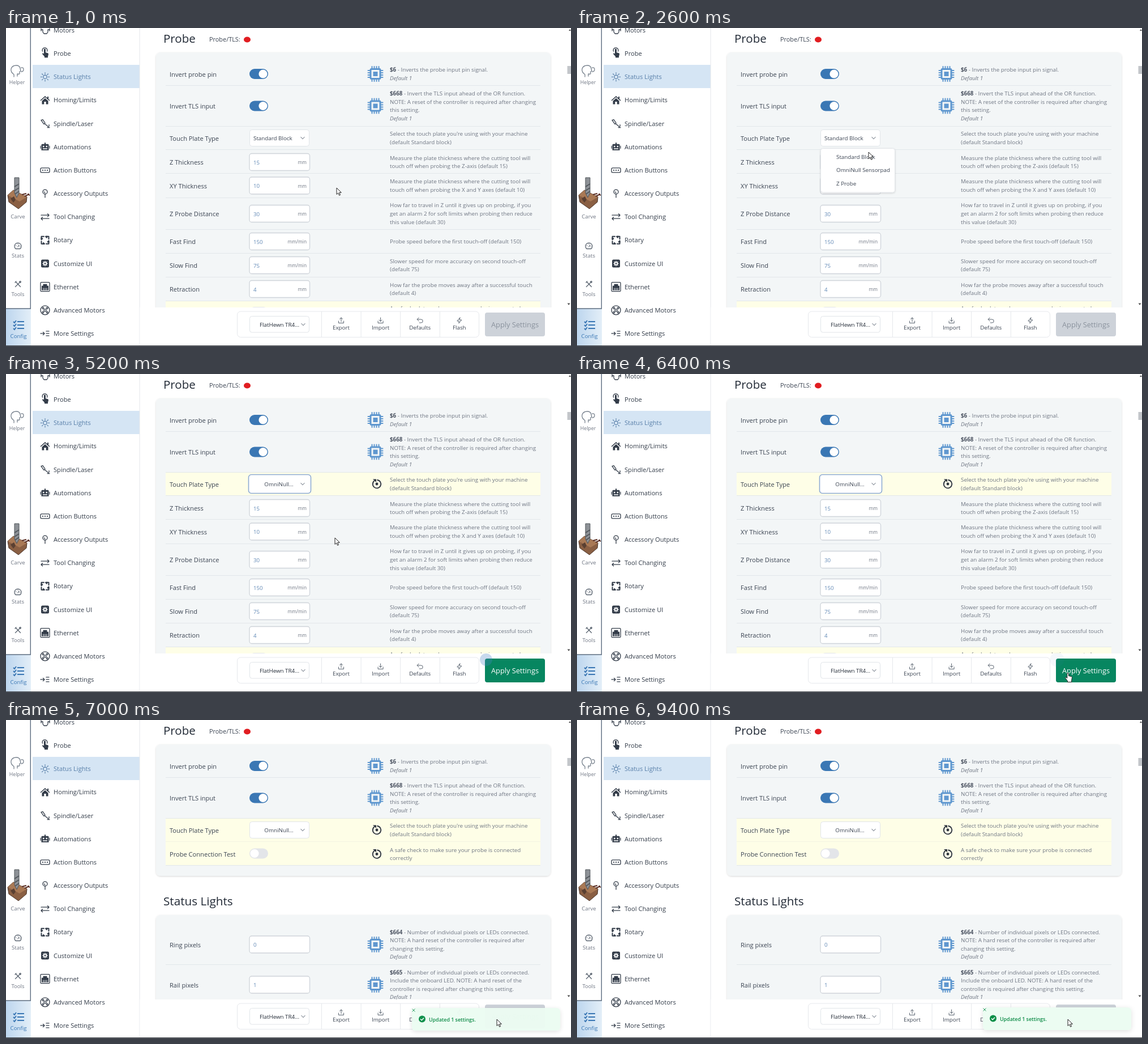
These frames come from a looping animation (998x561 px, 9800 ms). An HTML page:

```html
<!DOCTYPE html>
<html lang="en">
<head>
<meta charset="utf-8">
<title>Probe settings</title>
<style>
  html, body { margin: 0; width: 100%; height: 100%; overflow: hidden; background: #fff; }
  svg { display: block; font-family: "Open Sans", "Noto Sans", sans-serif; }
  .ln { fill: none; stroke: currentColor; stroke-width: 1.3; stroke-linecap: round; stroke-linejoin: round; }
  .solid { fill: currentColor; }
</style>
</head>
<body>
<svg id="stage" width="998" height="561" viewBox="0 0 998 561"></svg>
<script>
const LOOP = 9800, STEP = 200;
const INK = '#3b4452', GREY = '#6f7683', BLUE = '#3a77b4', VALUE = '#6088b5', EDGE = '#e1e5e9';

// Drawing helpers; text is placed by its vertical centre.
const text = (x, y, s, size, fill = INK, more = '') =>
  `<text x="${x}" y="${(y + size * .36).toFixed(1)}" font-size="${size}" fill="${fill}" ${more}>${s}</text>`;
const mid = 'text-anchor="middle"';
const rect = (x, y, w, h, r, fill, more = '') =>
  `<rect x="${x}" y="${y}" width="${w}" height="${h}" rx="${r}" fill="${fill}" ${more}/>`;
const stroke = (color, w = 1) => `stroke="${color}" stroke-width="${w}"`;
const line = (d, color, w = 1) => `<path d="${d}" fill="none" ${stroke(color, w)}/>`;
const icon = (x, y, color, body) => `<g transform="translate(${x} ${y})" color="${color}">${body}</g>`;
const ln = d => `<path class="ln" d="${d}"/>`;
const solid = d => `<path class="solid" d="${d}"/>`;
const ring = (r, x = 0, y = 0) => `<circle class="ln" cx="${x}" cy="${y}" r="${r}"/>`;
const spin = (n, body) =>
  Array.from({ length: n }, (_, i) => `<g transform="rotate(${i * 360 / n})">${body}</g>`).join('');
const chevron = (x, y) => line(`M${x - 3.5} ${y - 1.8}l3.5 3.5 3.5-3.5`, '#8d949e', 1.1);

const chip = y => icon(652.5, y, '#5f97cf',
  spin(4, ln('M-6-13V-9M-2-13V-9M2-13V-9M6-13V-9').replace('/>', ' style="stroke-width:2"/>')) +
  rect(-8.5, -8.5, 17, 17, 1.5, 'none', stroke('#5f97cf', 3)) + rect(-4, -4, 8, 8, 0, '#5f97cf'));
const reset = y => icon(655, y, '#2e3440',
  `<path class="ln" style="stroke-width:1.8" d="M-4.5-5.5A7.2 7.2 0 1 0 1-7"/>` +
  solid('M-7-8.5h6v5.5z') + '<circle class="solid" r="2.4"/>');

const toggle = (y, on) => rect(430, y - 9, 33, 18, 9, on ? BLUE : '#e3e5e9') +
  `<circle cx="${on ? 454 : 439}" cy="${y}" r="7.6" fill="#fff"/>`;
const input = (y, value, unit = '') =>
  rect(430, y - 15, 106.5, 30, 4, '#fff', stroke('#cfd4da', 1.3)) +
  text(437, y + .5, value, 9.7, VALUE) + text(531, y + .5, unit, 8.3, GREY, 'text-anchor="end"');
const picker = (y, value, focus) =>
  (focus ? rect(428.5, y - 16.5, 110, 33, 5, '#fff', stroke('#8fabd3', 1.6))
         : rect(430.5, y - 14.5, 105, 29, 4, '#fff', stroke(EDGE))) +
  (value.endsWith('...') ? text(482, y, value, 9.8, INK, mid) : text(437, y, value, 9.8)) + chevron(524, y);

const notes = (y, lines) => lines.map((s, i) => {
  const rich = s.replace(/^\$\d+/, m => `<tspan font-weight="700" fill="#4d5563">${m}</tspan>`);
  return text(678, y + (i - (lines.length - 1) / 2) * 14.6, rich, 9.8, GREY,
    s.startsWith('Default ') ? 'font-style="italic"' : '');
}).join('');
const row = (y, name, control, lines, side = '') =>
  text(289, y + .5, name, 11.1) + control + side + notes(y, lines);
const rule = y => line(`M282 ${y}.5H944`, '#e2e7ea');
const marked = (y, h) => rect(282, y, 662, h, 0, '#fefee7');
const panel = (y, h) => rect(265, y, 697, h, 8, '#f3f6f7', 'filter="url(#soft)"');

const SAFE = ['A safe check to make sure your probe is connected', 'correctly'];
const safeRow = y => row(y, 'Probe Connection Test', toggle(y - 1, false), SAFE, reset(y));

const head = () => text(278, 19, 'Probe', 20.5, '#222a36') + text(359, 20.5, 'Probe/TLS:', 10.9) +
  '<ellipse cx="426" cy="20.5" rx="6" ry="5" fill="#e11d21"/>';
const common = () =>
  row(81, 'Invert probe pin', toggle(81, true),
    ['$6 - Inverts the probe input pin signal.', 'Default 1'], chip(81)) + rule(101) +
  row(137.5, 'Invert TLS input', toggle(137.5, true),
    ['$668 - Invert the TLS input ahead of the OR function.',
     'NOTE: A reset of the controller is required after changing', 'this setting.', 'Default 1'], chip(137.5)) + rule(173);
const plate = (value, focus, changed) => row(194, 'Touch Plate Type', picker(194, value, focus),
  ["Select the touch plate you're using with your machine", '(default Standard block)'], changed ? reset(194) : '');

const blockRows = () => [
  [236.5, 'Z Thickness', 15, 'mm', ['Measure the plate thickness where the cutting tool will', 'touch off when probing the Z-axis (default 15)'], 256],
  [278, 'XY Thickness', 10, 'mm', ['Measure the plate thickness where the cutting tool will', 'touch off when probing the X and Y axes (default 10)'], 299],
  [327.5, 'Z Probe Distance', 30, 'mm', ['How far to travel in Z until it gives up on probing, if you', 'get an alarm 2 for soft limits when probing then reduce', 'this value (default 30)'], 355],
  [376.5, 'Fast Find', 150, 'mm/min', ['Probe speed before the first touch-off (default 150)'], 397],
  [418.5, 'Slow Find', 75, 'mm/min', ['Slower speed for more accuracy on second touch-off', '(default 75)'], 439],
  [460.5, 'Retraction', 4, 'mm', ['How far the probe moves away after a successful touch', '(default 4)'], 481]
].map(([y, name, v, unit, lines, end]) => row(y, name, input(y, v, unit), lines) + rule(end)).join('');

const blockScene = (value, changed) => head() + panel(43, 500) + (changed ? marked(174, 41) : '') + common() +
  plate(value, changed, changed) + rule(214) + blockRows() + marked(482, 42) + safeRow(502);
const shortScene = () => head() + panel(43, 232) + marked(174, 83) + common() +
  plate('OmniNull...', false, true) + line('M282 214.5H944', '#f3f4e2') + safeRow(236.5) + rule(256) +
  text(278, 319, 'Status Lights', 20.7, '#222a36') + panel(344, 200) +
  row(396, 'Ring pixels', input(396, 0),
    ['$664 - Number of individual pixels or LEDs connected.', 'NOTE: A hard reset of the controller is required after',
     'changing this setting.', 'Default 0'], chip(396)) + rule(431) +
  row(467, 'Rail pixels', input(467, 1),
    ['$665 - Number of individual pixels or LEDs connected.', 'Include the onboard LED. NOTE: A hard reset of the',
     'controller is required after changing this setting.', 'Default 1'], chip(467));

const nav = [
  ['Motors', ln('M-7-1h3v4l2 3h5l2-3v-4h3M-7-3v4M8-3v4')],
  ['Probe', solid('M-2-8q1.5-1.5 3 0v6l4 1.2q1 .5 1 2l-1 4v2h-6v-2l-4-4.5q0-1.8 1.5-1.3l1.5 1z') + ln('M-4.5-4a4.4 4.4 0 1 1 8 0')],
  ['Status Lights', ring(3.3) + spin(8, ln('M0-5.8V-7.5'))],
  ['Homing/Limits', solid('M-8.5 0L0-7.5 4-4v-2.5h2v4.3L8.5 0l-1 1L0-5.5-7.5 1zM-5.5 1.2L0-3.6 5.5 1.2V7H1.7V2.5h-3.4V7h-3.8z')],
  ['Spindle/Laser', ln('M-7-6l3-1 4 6-2 2zM-1 0l7 6M4 7h4M7 2v3')],
  ['Automations', solid('M-1-7.5h2V-5h4q1.5 0 1.5 1.5V6h-13v-9.5Q-6.500-5-5-5h4zM-8.500-2h1.200v5h-1.200zM7.300-2h1.200v5H7.300z') +
    '<path fill="#fff" d="M-4-2h2.500v2.500H-4zM1.500-2H4V.5H1.500zM-4 2.500h8V4h-8z"/>'],
  ['Action Buttons', '<rect class="ln" x="-8" y="-4" width="16" height="8" rx="2"/>' + [-4, 0, 4].map(x => `<circle class="solid" cx="${x}" r="1.100"/>`).join('')],
  ['Accessory Outputs', ring(4, 0, -3) + ln('M0 1v6M-1.500-3L0-1')],
  ['Tool Changing', ln('M-7-3H7M4.500-5.500L7-3 4.500-.5M7 3H-7M-4.500.5L-7 3l2.500 2.500')],
  ['Rotary', spin(4, '<path class="ln" style="stroke-width:2" d="M-6.500-2v-4.500h4.500M1-6.500l2 2M1-6.500h3"/>')],
  ['Customize UI', rect(-7, -7, 14, 14, 2.5, 'currentColor') + '<g color="#fff"><circle class="ln" r="2.300" style="stroke-width:1.800"/>' + spin(8, ln('M0-3.500v-.7')) + '</g>'],
  ['Ethernet', '<rect class="ln" x="-8" y="-8" width="16" height="16" rx="1.500"/>' + solid('M-6 6V-2h2.500v-3h7v3H6v8z') +
    '<path d="M-3 6V2M0 6V2M3 6V2" stroke="#fff"/>'],
  ['Advanced Motors', ring(8) + ring(2) + spin(4, ring(1.3, 3.6, -3.6))],
  ['More Settings', ln('M-8 0h7M-3.500-2.500L-1 0l-2.500 2.500M2-4h5M2 0h5M2 4h5')]
];
const sidebar = () => rect(47, 65, 189, 41, 0, '#d5e5f4') + line('M236 0V560', '#e3e6ea') +
  nav.map(([name, art], i) => {
    const y = 4 + i * 41.15, color = i === 2 ? '#587fa9' : '#333c49';
    return icon(69, y, color, art) + text(84, y, name, 11.1, color);
  }).join('');

const rail = () =>
  rect(0, 495, 44, 65, 0, 'url(#tile)') + line('M43.3 0V495H0', '#5d6d80', 1.4) +
  icon(19, 76, '#77818d', ln('M-5 10V6q-6-4-5-10 2-6 9-6 6 0 7 5l1 5-2 1v3q0 2-4 1v4M8-6q4-1 4 3t-4 4')) +
  text(19.5, 96, 'Helper', 8.8, GREY, mid) +
  '<path d="M3 295l10-9 24 12-1 9-14 12-17-12z" fill="#8a5f43" stroke="#4a352a"/>' +
  '<path d="M3 295l10-9 24 12-13 8z" fill="#a97955"/><path d="M8 301l6-4 3 6-4 5z" fill="#5a4032"/>' +
  '<path d="M15 264h8v27l-4 8-4-8z" fill="#8e9297" stroke="#4f5459"/>' +
  line('M15 280l8-5M15 287l8-5M16 293l7-5', '#50555a', 1.6) + line('M28 294l8-2M33 297l8-4M38 293l4 2', '#5b2f25', 2) +
  text(21, 332, 'Carve', 9.6, GREY, mid) +
  icon(21, 385, '#59636f', ln('M-4 4.500a6 6 0 1 1 8 0zM0 1l2-3M-3.500-1h.1M3.500 0h.1M0-4h.1')) +
  text(21, 401, 'Stats', 9.6, GREY, mid) +
  icon(21, 452, '#59636f', ln('M-4.500 4.500L4-4M-4-4.500l8.500 9M-5-3l2-2M2.500-4.500l2-1M4.500-2.500l1-2')) +
  text(21, 469, 'Tools', 9.6, GREY, mid) +
  icon(22, 524, BLUE, '<g stroke-width="2">' + [-6, 0, 6].map(y =>
    `<path d="M-2 ${y}H10M-9 ${y}l2 2 3-4" fill="none" stroke="currentColor"/>`).join('') + '</g>') +
  text(22, 543.5, 'Config', 9.7, BLUE, mid);

const tools = [
  ['Export', 'M0 2V-5M-2.500-2.500L0-5l2.500 2.500M-4.500 1v3.500h9V1'],
  ['Import', 'M0-5V1.500M-2.500-1L0 1.500 2.500-1M-4.500 1v3.500h9V1'],
  ['Defaults', 'M-2-5l-3 3 3 3M-5-2H2q3 0 3 3t-3 3H-1'],
  ['Flash', 'M1-5L-4 1h3.500L-1 5l5-6H.5z']
];
const footer = () => rect(236.5, 493, 754, 67, 0, '#fff') +
  rect(408.500, 500, 427, 45.500, 6, '#fff', stroke('#e6e8ec')) + rect(430.500, 508.500, 105, 28.500, 4, '#fff', stroke(EDGE)) +
  text(483, 523, 'FlatHewn TR4...', 9.8, '#222a36', mid) + chevron(525, 523) +
  tools.map(([name, d], i) => line(`M${557.5 + i * 69.6} 500V545`, '#e6e8ec') +
    icon(592 + i * 69.6, 516, '#59636f', ln(d).replace('/>', ' style="stroke-width:1"/>')) +
    text(592 + i * 69.6, 528.5, name, 9.8, INK, mid + ' font-weight="500"')).join('');
const apply = (bg, fg) => rect(846, 502, 106, 42, 4, bg) + text(899, 523.5, 'Apply Settings', 12.75, fg, mid);

const menu = () => rect(430.5, 212.5, 131, 77.500, 4, '#fff', stroke('#e3e6ea') + ' filter="url(#soft)"') +
  ['Standard Block', 'OmniNull Sensorpad', 'Z Probe'].map((s, i) => text(458, 227 + i * 23.5, s, 9.8)).join('');
const toast = () => rect(717, 507, 262, 40, 6, '#ecfcf2', 'filter="url(#lift)"') +
  line('M717.500 508.500l5 5M722.500 508.500l-5 5', '#2a9a5f') +
  '<circle cx="735" cy="526.500" r="6" fill="#0b8f48"/>' + line('M732 526.500l2.200 2.200 3.800-4', '#fff', 1.5) +
  text(747, 527.500, 'Updated 1 settings.', 8.9, '#0a8a45', 'font-weight="600"');

const pointers = {
  arrow: '<path d="M0 0v11.500l2.700-2.500 1.900 4.300 1.900-.8-1.900-4.200h3.700z" fill="#fff" stroke="#222"/>',
  beam: '<path d="M-2.500-5.500q2.500 0 2.500 1.500v9q0 1.500-2.500 1.500M2.500-5.500Q0-5.500 0-4M2.500 6.500Q0 6.500 0 5" fill="none" stroke="#222" stroke-width="1.200"/>',
  hand: '<path d="M-1.200 0q1.400-1.200 2.600 0v4.500l5 1.200q1.200.5 1 2l-.8 5.300v2.500H-.5v-2l-3.800-5q-.3-2 1.300-1.500l1.800 1.500z" fill="#fff" stroke="#222"/>'
};

const group = (id, body) => `<g id="${id}">${body}</g>`;
const $ = id => document.getElementById(id);
$('stage').innerHTML = `<defs>
  <clipPath id="view"><rect x="237" width="754" height="493"/></clipPath>
  <linearGradient id="tile"><stop stop-color="#bdd6ee"/><stop offset="1" stop-color="#e3eef8"/></linearGradient>
  <filter id="soft" x="-5%" y="-10%" width="110%" height="125%"><feDropShadow dx="0" dy="1" stdDeviation="1.500" flood-opacity=".16"/></filter>
  <filter id="lift" x="-10%" y="-40%" width="120%" height="190%"><feDropShadow dx="0" dy="2" stdDeviation="4" flood-opacity=".12"/></filter>
  </defs>` + rect(0, 0, 998, 561, 0, '#fff') + rail() + sidebar() +
  '<g clip-path="url(#view)">' + group('before', blockScene('Standard Block', false)) +
  group('changed', blockScene('OmniNull...', true)) + group('after', shortScene()) + '</g>' +
  footer() + group('idle', apply('#cdd2d9', '#8a929d')) + group('ready', apply('#078660', '#fff')) +
  '<circle id="ping" cx="848" cy="504" fill="#4a84c4"/>' +
  rect(991.5, 67, 6.500, 14, 0, '#c3c6ca') + '<path d="M994 489l-2.500-3.500h5zM996 2l2 3h-4z" fill="#555"/>' +
  rect(0, 560, 998, 1, 0, '#3c3f44') + group('menu', menu()) + group('toast', toast()) +
  Object.entries(pointers).map(([id, body]) => group(id, body)).join('');

// Pointer stops: time, x, y.
const path = [[0, 584, 282], [200, 584, 282], [1600, 499, 193], [2000, 499, 193], [2600, 515, 219], [3500, 507, 250],
  [4000, 507, 250], [5200, 581, 289], [5400, 581, 289], [6400, 867, 528], [LOOP, 867, 528]];
const smooth = p => p * p * (3 - 2 * p);
function pointerAt(t) {
  const i = path.findIndex(k => k[0] > t), a = path[i - 1], b = path[i];
  const e = smooth((t - a[0]) / (b[0] - a[0]));
  return [a[1] + (b[1] - a[1]) * e, a[2] + (b[2] - a[2]) * e];
}
const show = (id, on) => { $(id).style.display = on ? '' : 'none'; };

const PICK = 4000, DONE = 6800;
function draw(t) {
  const edited = t >= PICK && t < DONE;
  show('before', t < PICK);
  show('changed', edited);
  show('after', t >= DONE);
  show('idle', !edited);
  show('ready', edited);
  show('menu', t >= 2000 && t < PICK);

  show('ping', edited);
  const fade = Math.pow(1 - Math.min(1, (t % 1000 + 20) / 750), 3.4);
  $('ping').setAttribute('r', 6.5 * (2 - fade));
  $('ping').setAttribute('opacity', fade);

  const rise = 1 - Math.pow(1 - Math.min(1, Math.max(0, (t - 6650) / 500)), 3);
  show('toast', t >= DONE);
  $('toast').setAttribute('transform', `translate(0 ${40 * (1 - rise)})`);
  $('toast').setAttribute('opacity', rise);

  const [x, y] = pointerAt(t);
  const kind = edited && x < 537 ? 'beam' : edited && x > 846 && y > 502 ? 'hand' : 'arrow';
  for (const id in pointers) show(id, id === kind);
  $(kind).setAttribute('transform', `translate(${x} ${y})`);
}

const start = performance.now();
let last = -1;
function tick() {
  const t = Math.floor((performance.now() - start) % LOOP / STEP) * STEP;
  if (t !== last) draw(last = t);
  requestAnimationFrame(tick);
}
tick();
</script>
</body>
</html>
```
